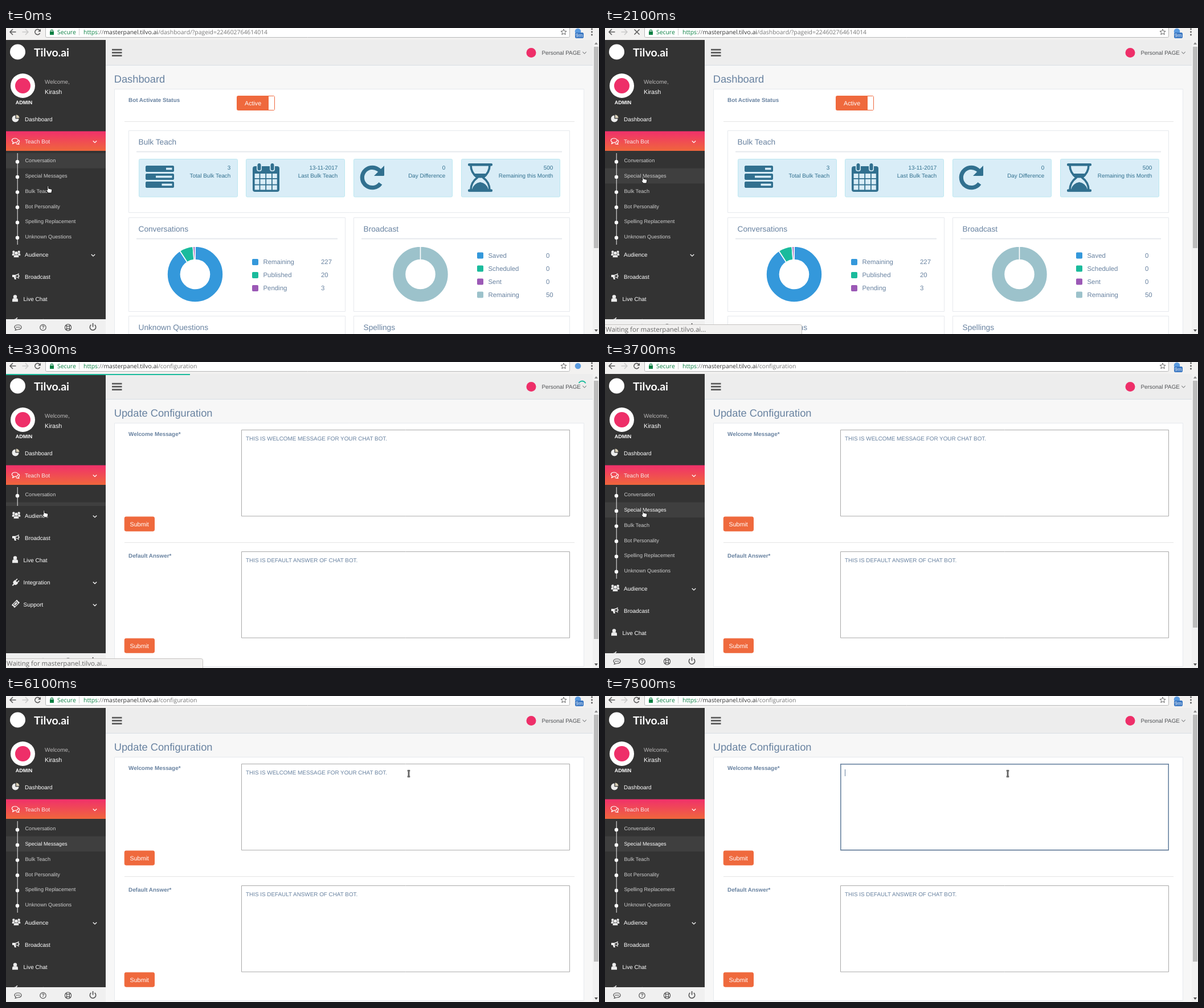
Animation of 1041x538 px, one loop 8000 ms. Source, as an HTML page with a canvas:

```html
<!DOCTYPE html>
<html lang="en">
<head>
<meta charset="utf-8">
<title>Bot configuration</title>
<style>
html, body { margin: 0; width: 100%; height: 100%; overflow: hidden; background: #f7f7f7; }
canvas { display: block; }
</style>
</head>
<body>
<canvas id="stage" width="1041" height="538"></canvas>
<script>
const g = document.getElementById('stage').getContext('2d');
const LOOP = 8000;
const SANS = '"Liberation Sans", Arial, sans-serif';
const UI = '"Open Sans", "Noto Sans", sans-serif';
const SLATE = '#6882a0', ORANGE = '#ef693d', TEAL = '#1abb9c', INFO = '#31708f', CARD = '#d9edf7';
const EDGE = '#e6e9ed', SIDE = '#333333', PINK = '#ee2f69';
const SITE = 'masterpanel.tilvo.ai';
const WELCOME = 'THIS IS WELCOME MESSAGE FOR YOUR CHAT BOT.';

// ---- helpers ----
function rect(x, y, w, h, c) { g.fillStyle = c; g.fillRect(x, y, w, h); }

function box(x, y, w, h, fill, edge, r = 0) {
  g.beginPath();
  g.roundRect(x + .5, y + .5, w - 1, h - 1, r);
  g.fillStyle = fill; g.fill();
  g.strokeStyle = edge; g.lineWidth = 1; g.stroke();
}

// Text set by its left edge and the middle of its capitals.
// The tiny turn switches off glyph hinting, which would flatten small letters.
function text(s, x, mid, size, color, { bold = '', align = 'left', font = SANS } = {}) {
  g.save();
  g.font = `${bold} ${size}px ${font}`;
  g.textAlign = align;
  g.textRendering = 'geometricPrecision';
  g.fillStyle = color;
  g.translate(x, mid + size * .344);
  g.rotate(2e-4);
  g.fillText(s, 0, 0);
  const { width } = g.measureText(s);
  g.restore();
  return width;
}

function disc(x, y, r, c) {
  g.beginPath(); g.arc(x, y, r, 0, 7); g.fillStyle = c; g.fill();
}

function ring(x, y, r, c, w, from = 0, to = 2 * Math.PI) {
  g.beginPath(); g.arc(x, y, r, from, to);
  g.strokeStyle = c; g.lineWidth = w; g.stroke();
}

function path(d, x, y, { fill, stroke, width = 1, turn = 0 }) {
  const p = new Path2D(d);
  g.save();
  g.translate(x, y); g.rotate(turn);
  g.lineJoin = 'round';
  if (fill) { g.fillStyle = fill; g.fill(p); }
  if (stroke) { g.strokeStyle = stroke; g.lineWidth = width; g.stroke(p); }
  g.restore();
}

const chevron = (x, y, c, w = 1.3) => path('M-3.2-1.5L0 1.6 3.2-1.5', x, y, { stroke: c, width: w });

// ---- browser chrome ----
function toolbar(s) {
  rect(0, 0, 1041, 21, '#f2f1f0');
  const dark = '#5a5a5a';
  path('M5.5 0H-5M0-5L-5 0 0 5', 12, 7, { stroke: dark, width: 1.6 });
  path('M-5.5 0H5M0-5L5 0 0 5', 34, 7, { stroke: '#c9c9c9', width: 1.6 });
  if (s.loading) path('M-4.5-4.5L4.5 4.5M4.5-4.5L-4.5 4.5', 56, 7, { stroke: dark, width: 1.6 });
  else {
    ring(55.5, 7, 4.6, dark, 1.6, .5, 5.6);
    path('M5.5-5.5V-.5H.5Z', 55.5, 7, { fill: dark });
  }
  box(69, -6, 921, 23, '#fff', '#b8b8b8', 2);
  const green = '#0b8043';
  rect(77, 6, 7, 6, green);
  ring(80.5, 5.5, 2.2, green, 1.3, Math.PI, 2 * Math.PI);
  const o = { font: UI };
  text('Secure', 90, 7, 10.4, green, o);
  rect(128, 1, 1, 12, '#d0d0d0');
  let x = 136;
  const parts = [['https', green], ['://', '#777'], [SITE, '#333'], [s.url, '#777']];
  for (const [str, c] of parts) x += text(str, x, 7, 10.4, c, o);
  path('M0-5L1.4-1.6 5-1.4 2.3 1 3.2 4.6 0 2.6-3.2 4.6-2.3 1-5-1.4-1.4-1.6Z', 979, 7, { stroke: '#666' });
  disc(1004, s.badge ? 6 : 7, 5.3, '#5b9be0');
  if (s.badge) {
    box(999, 8, 15, 10, '#3b78c3', '#3b78c3', 1.5);
    text('9m', 1006.5, 13, 8.5, '#fff', { font: UI, align: 'center' });
  }
  for (const y of [2, 7, 12]) disc(1028.5, y, 1.4, dark);
}

function scrollbar(end) {
  rect(1030, 21, 11, 517, '#f1f1f1');
  rect(1032, 33, 8, end - 33, '#bcbcbc');
  path('M-3 2L0-2 3 2Z', 1036, 27, { fill: '#8a8a8a' });
  path('M-3-2L0 2 3-2Z', 1036, 532, { fill: '#505050' });
}

function status(str, alpha) {
  if (!str) return;
  g.globalAlpha = alpha;
  box(-4, 521, 350, 24, '#f2f1f0', '#c6c4c2', 3);
  text(str, 1, 530.5, 11.5, '#666', { font: UI });
  g.globalAlpha = 1;
}

// ---- sidebar ----
const WHITE = '#ececec';

const icons = {
  pie(x, y) {
    g.beginPath(); g.moveTo(x - .5, y + .5); g.arc(x - .5, y + .5, 6, 0, Math.PI * 1.5); g.fillStyle = WHITE; g.fill();
    g.beginPath(); g.moveTo(x + .8, y - .8); g.arc(x + .8, y - .8, 5.6, -Math.PI / 2, 0); g.fillStyle = '#d8cfb8'; g.fill();
  },
  chat(x, y) {
    path('M-1.5-5C6-5 6 2.4-1.5 2.4L-5.5 4.6-4.2 1.6C-8.5-.5-6.5-5-1.5-5ZM5-2.2C7.5-.5 7 2.2 4.8 3.2L6 5.4C3.5 5.4 1.5 4.8 .5 4', x, y, { stroke: '#fff', width: 1.2 });
  },
  users(x, y) {
    for (const dx of [-4.6, 4.6]) {
      disc(x + dx, y - 3.8, 2.2, WHITE);
      path('M-2.6 2.6V.2Q-2.6-1.4 0-1.4T2.6 .2V2.6Z', x + dx, y, { fill: WHITE });
    }
    disc(x, y - 1.6, 3.5, SIDE);
    disc(x, y - 1.6, 2.9, WHITE);
    path('M-4.6 6V3.6Q-4.6 1.2 0 1.2T4.6 3.6V6Z', x, y, { fill: WHITE, stroke: SIDE, width: .6 });
  },
  horn(x, y) {
    path('M-6-2.5H-1Q3-3 5.5-5.5V4.5Q3 2 0 1.6L1 5.6H-2L-3.2 1.6H-6Z', x, y, { fill: WHITE });
    path('M0-1Q2.5-1.5 4.3-3V2Q2.5 .8 0 .5Z', x, y, { fill: SIDE });
    rect(x + 5, y - 1.5, 1.6, 2.4, WHITE);
  },
  user(x, y) {
    disc(x, y - 2.8, 3.2, WHITE);
    path('M-5 6V3Q-5 0-2.5 0H2.5Q5 0 5 3V6Z', x, y, { fill: WHITE });
  },
  plug(x, y) {
    path('M-4-2H4V1Q4 4 1 4.3V8H-1V4.3Q-4 4-4 1ZM-3-6.4H-1.4V-2H-3ZM1.4-6.4H3V-2H1.4Z', x, y + 1.2, { fill: WHITE, turn: .78 });
  },
  ticket(x, y) {
    path('M-6.5-3.6H6.5V-1.2Q5 0 6.5 1.2V3.6H-6.5V1.2Q-5 0-6.5-1.2Z', x, y, { fill: WHITE, turn: -.8 });
    path('M-3.5-1.8H3.5V1.8H-3.5Z', x, y, { stroke: SIDE, turn: -.8 });
  }
};

const SUB = ['Conversation', 'Special Messages', 'Bulk Teach', 'Bot Personality', 'Spelling Replacement', 'Unknown Questions'];
const LOWER = [
  ['Audience', 'users', 18, 33, true], ['Broadcast', 'horn', 17, 33], ['Live Chat', 'user', 16, 30.5],
  ['Integration', 'plug', 17, 30.5, true], ['Support', 'ticket', 17, 30.5, true]
];

function sidebar(s) {
  rect(0, 21, 175, 517, SIDE);
  disc(20.5, 42, 13.5, '#fff');
  text('Tilvo.ai', 49, 43, 19.5, '#fff', { bold: 'bold', font: 'Lato, sans-serif' });
  disc(29.5, 101.5, 21.5, '#fff');
  disc(29.5, 101.5, 13.5, PINK);
  text('ADMIN', 31.5, 130.5, 9, '#fff', { bold: 'bold', align: 'center' });
  text('Welcome,', 68, 95, 9.9, '#bab8b8');
  text('Kirash', 68, 112.5, 10.7, '#fff');
  icons.pie(17, 159);
  text('Dashboard', 33, 160.5, 9.95, '#fff');

  const grad = g.createLinearGradient(0, 181, 0, 216);
  grad.addColorStop(0, '#f0306c'); grad.addColorStop(1, '#f0663c');
  rect(0, 181.5, 175, 34.5, grad);
  icons.chat(17, 199);
  text('Teach Bot', 33, 199.5, 9.95, '#f6e6e6');
  chevron(156, 200, '#fff');

  g.save();
  g.beginPath(); g.rect(0, 216, 175, 296); g.clip();
  const bottom = 381 - s.fold;
  g.save();
  g.beginPath(); g.rect(0, 216, 175, bottom - 216); g.clip();
  rect(0, 220 + 26.7 * s.hover, 175, 26.7, '#3f3f3f');
  rect(19.7, 220, 1, 161, '#f0f0f0');
  SUB.forEach((name, i) => {
    const y = 233.3 + 26.7 * i;
    disc(20, y + 1.9, 3.2, '#fff');
    text(name, 33.5, y, 9.15, s.config && i === 1 ? '#fff' : '#cdcdcd');
  });
  g.restore();
  LOWER.forEach(([name, icon, ix, tx, more], i) => {
    const y = 399 - s.fold + 38.9 * i;
    icons[icon](ix, y - 1.5);
    text(name, tx, y, 9.95, '#fff');
    if (more) chevron(s.config ? 156 : 153, y + .5, '#fff');
  });
  g.restore();
  footer();
}

function footer() {
  const c = '#555';
  rect(0, 512, 175, 26, '#f0f0f0');
  path('M0-4.5C8-4.5 8 3.5 0 3.5L-5 5-3.6 2.6C-8 0-6-4.5 0-4.5Z', 21, 526.5, { stroke: c, width: 1.2 });
  for (const dx of [-2.5, 0, 2.5]) disc(21 + dx, 526, .9, c);
  ring(65, 526.5, 5.2, c, 1.2);
  text('?', 65, 526.5, 8.5, c, { bold: 'bold', align: 'center' });
  ring(109, 526.5, 5.6, c, 1.2);
  ring(109, 526.5, 2.5, c, 1.2);
  for (let i = 0; i < 4; i++) ring(109, 526.5, 4, c, 2.6, i * Math.PI / 2 + .55, i * Math.PI / 2 + 1.02);
  ring(152.5, 526, 5.2, c, 1.6, -.9, Math.PI + .9);
  rect(151.7, 519, 1.7, 6.5, c);
}

// ---- content ----
function header(title) {
  rect(175, 21, 856, 517, '#f7f7f7');
  rect(175, 21, 856, 45, '#ededed');
  rect(175, 65, 856, 1, '#d9dee4');
  for (const y of [36.8, 42, 47.3]) rect(186, y, 17.5, 2.7, '#5a5a5a');
  disc(922, 43.5, 8.5, PINK);
  text('Personal PAGE', 940.5, 43.3, 9.9, '#515356');
  chevron(1015.5, 43.5, '#515356', 1);
  text(title, 189.7, 90, 18.3, SLATE);
}

function panel(x, y, w, h, title) {
  box(x, y, w, h, '#fff', EDGE);
  text(title, x + 17.5, y + 20, 13.7, SLATE);
  rect(x + 14, y + 36.5, w - 28, 2, EDGE);
}

const bigIcons = [
  x => [[242, 36], [256, 18], [270, 28.5]].forEach(([y, from]) => {
    box(x, y, 50, 11, INFO, INFO, 1.5);
    rect(x + from, y + 3.7, 46.5 - from, 3.6, CARD);
  }),
  x => {
    box(x, 243, 47, 45, INFO, INFO, 3);
    let cx = x + 3.6;
    for (const w of [8, 8.9, 8.9, 8]) {
      let cy = 256;
      for (const h of [8, 8.9, 8]) { rect(cx, cy, w, h, CARD); cy += h + 1.8; }
      cx += w + 1.8;
    }
    for (const dx of [8.5, 31.5]) {
      box(x + dx - 1.5, 237, 9, 15, CARD, CARD, 3);
      box(x + dx, 238, 6, 12.5, INFO, INFO, 2);
    }
  },
  x => {
    ring(x + 21, 263, 17.7, INFO, 7.2, .62, Math.PI * 1.76);
    path('M42-21V-4.5Q42-3 40.5-3H24Z', x, 263, { fill: INFO });
  },
  x => {
    for (const y of [238, 283.5]) box(x, y, 43, 4.6, INFO, INFO, 1);
    path('M5 241C5 253 11 259 16.5 263 11 267 5 273 5 285M38 241C38 253 32 259 26.5 263 32 267 38 273 38 285', x, 0, { stroke: INFO, width: 3.6 });
    path('M10 256H33Q28 260 25 263.5H18Q15 260 10 256ZM7 284Q10 273 21.5 271 33 273 36 284Z', x, 0, { fill: INFO });
  }
];

function donut(x, y, parts) {
  const sum = parts.reduce((a, p) => a + p[0], 0);
  let a = -Math.PI / 2;
  for (const [v, c] of parts) {
    const b = a + v / sum * 2 * Math.PI;
    g.beginPath();
    g.arc(x, y, 49, a, b); g.arc(x, y, 25.5, b, a, true);
    g.closePath();
    g.fillStyle = c; g.fill();
    g.strokeStyle = '#fff'; g.lineWidth = 1.6; g.stroke();
    a = b;
  }
}

function legend(x, y, rows) {
  rows.forEach(([name, value, color], i) => {
    const cy = y + 23 * i;
    box(x, cy - 5.5, 11, 11, color, color, 1);
    text(name, x + 19.5, cy, 11.4, SLATE);
    text(value, x + 121, cy, 11.4, SLATE);
  });
}

const BLUE = '#3498db', PURPLE = '#9b59b6', MIST = '#9cc2cb';

function dashboard() {
  header('Dashboard');
  box(190, 107, 825, 440, '#fff', EDGE);
  text('Bot Activate Status', 215, 126.5, 9.9, SLATE, { bold: 'bold' });
  box(405, 119, 67, 26, ORANGE, ORANGE, 2);
  rect(461, 120, 10, 24, '#fff');
  text('Active', 419, 132.3, 10.7, '#fff');
  rect(208, 164, 790, 1, '#e4e4e4');

  panel(215, 180, 775, 145, 'Bulk Teach');
  const cards = [['3', 'Total Bulk Teach'], ['13-11-2017', 'Last Bulk Teach'], ['0', 'Day Difference'], ['500', 'Remaining this Month']];
  cards.forEach(([value, label], i) => {
    const x = Math.round(232.5 + 188.8 * i);
    box(x, 230, 174, 67.5, CARD, '#bce8f1', 2);
    bigIcons[i](x + 12);
    text(value, x + 161.3, 245.5, 9.9, INFO, { align: 'right' });
    text(label, x + 161.3, 260, 9.9, INFO, { align: 'right' });
  });

  panel(215, 333, 381, 166, 'Conversations');
  donut(332, 433, [[227, BLUE], [20, TEAL], [3, PURPLE]]);
  legend(432, 411.5, [['Remaining', '227', BLUE], ['Published', '20', TEAL], ['Pending', '3', PURPLE]]);
  panel(610, 333, 380, 166, 'Broadcast');
  donut(727.5, 433, [[50, MIST]]);
  legend(827, 400, [['Saved', '0', BLUE], ['Scheduled', '0', TEAL], ['Sent', '0', PURPLE], ['Remaining', '50', MIST]]);
  panel(215, 506, 381, 90, 'Unknown Questions');
  panel(610, 506, 380, 90, 'Spellings');
  scrollbar(387);
}

function field(y, label) {
  text(label, 215, y + 7.5, 9.9, SLATE, { bold: 'bold' });
  box(413, y, 577, 152.5, '#fff', '#a9a9a9');
  box(207.7, y + 152.7, 53.3, 26, ORANGE, ORANGE, 2.5);
  text('Submit', 217.5, y + 166, 10.7, '#fff');
}

function message(t) {
  const draw = c => text(WELCOME, 421, 134.7, 9.9, c);
  if (t >= 6300) {
    g.strokeStyle = SLATE; g.lineWidth = 1.6;
    g.strokeRect(413.8, 119.8, 575.4, 151);
  }
  if (t >= 7500) return rect(421, 129, 1, 12, SLATE);
  const w = draw(SLATE);
  if (t < 6300) return;
  if (t < 6500) return rect(421 + w, 129, 1, 12, SLATE);
  // Double click picks the full stop, triple click the whole line.
  const from = t < 6800 ? 418.5 + w : 421;
  g.save();
  g.beginPath(); g.rect(from, 129, 421 + w - from, 12); g.clip();
  rect(413, 129, 400, 12, '#3297fd');
  draw('#fff');
  g.restore();
}

function config(t) {
  header('Update Configuration');
  box(190, 107, 825, 429, '#fff', EDGE);
  field(119, 'Welcome Message*');
  rect(208, 317, 790, 1, '#e4e4e4');
  field(333, 'Default Answer*');
  text('THIS IS DEFAULT ANSWER OF CHAT BOT.', 421, 348.5, 9.9, SLATE);
  message(t);
  scrollbar(t < 3500 ? 487 : 467);
}

function progress(t) {
  rect(0, 21, t < 3400 ? 323 : 760, 2, TEAL);
  const a = (t < 3400 ? 0 : 1.4) - 2.7;
  ring(1011.5, 40, 6.5, TEAL, 1.8, a, a + 2.3);
}

// ---- pointer ----
const HAND = 'M-3.2-5.6Q-2.2-7-1.2-5.6V-1.8L3.6-.7Q5 -.2 4.8 1.4L3.8 6H-2L-5 1.8Q-5.4 .2-4 .5L-3.2 1.3Z';
const ARROW = 'M0 0V11L2.6 8.7 4.3 12.6 6.2 11.8 4.5 8H8Z';
const BEAM = 'M-2.2-5.2H2.2M-2.2 5.2H2.2M0-5.2V5.2';

function pointerAt(t) {
  const rests = [[6100, 707.5, 136.5], [5100, 723.5, 147.5]];
  for (const [at, x, y] of rests) if (t >= at) return [x, y];
  if (t >= 4200) {
    const left = 1 - Math.min(1, (t - 4100) / 900);
    return [715.5 - 646.5 * left ** 1.624, 154.5 + 112.5 * left ** 1.218];
  }
  const steps = [[1500, 69, 267], [1400, 73, 266.5], [1300, 71, 268], [800, 65.5, 272], [700, 69, 279], [400, 73, 286], [300, 74, 285]];
  for (const [at, x, y] of steps) if (t >= at) return [x, y];
  return [76, 284];
}

function pointer(t) {
  const [x, y] = pointerAt(t);
  if (x > 413) {
    path(BEAM, x - .5, y, { stroke: '#2a2a2a', width: 2.6 });
    path(BEAM, x - .5, y, { stroke: '#bbb', width: .8 });
  } else if (x > 175 || (t >= 3200 && t < 3300)) {
    path(ARROW, x - 1, y - 5, { fill: '#111', stroke: '#fff' });
  } else path(HAND, x, y, { fill: '#fff', stroke: '#111' });
}

// ---- timeline ----
function statusText(t) {
  if (t < 300 || t >= 3700) return '';
  if (t < 700) return `https://${SITE}/bulkteach`;
  if (t < 2000) return `https://${SITE}/configuration`;
  if (t >= 2500 && t < 2800) return 'Connecting...';
  if (t >= 2800 && t < 3000) return 'Establishing secure connection...';
  return `Waiting for ${SITE}...`;
}

function frame(now) {
  const t = Math.floor(now % LOOP / 100) * 100;
  const s = {
    config: t >= 3300,
    loading: t >= 2000 && t < 3300,
    badge: t < 3200 || t >= 3500,
    url: t < 3200 ? '/dashboard/?pageid=224602764614014' : '/configuration',
    hover: t < 300 ? 0 : t < 700 ? 2 : 1,
    fold: t < 3300 || t >= 3500 ? 0 : t < 3400 ? 128 : 56
  };
  g.clearRect(0, 0, 1041, 538);
  if (s.config) config(t); else dashboard();
  sidebar(s);
  toolbar(s);
  if (t >= 3300 && t < 3500) progress(t);
  status(statusText(t), t < 3500 ? 1 : .15);
  pointer(t);
  requestAnimationFrame(() => frame(performance.now()));
}
frame(0);
</script>
</body>
</html>
```
